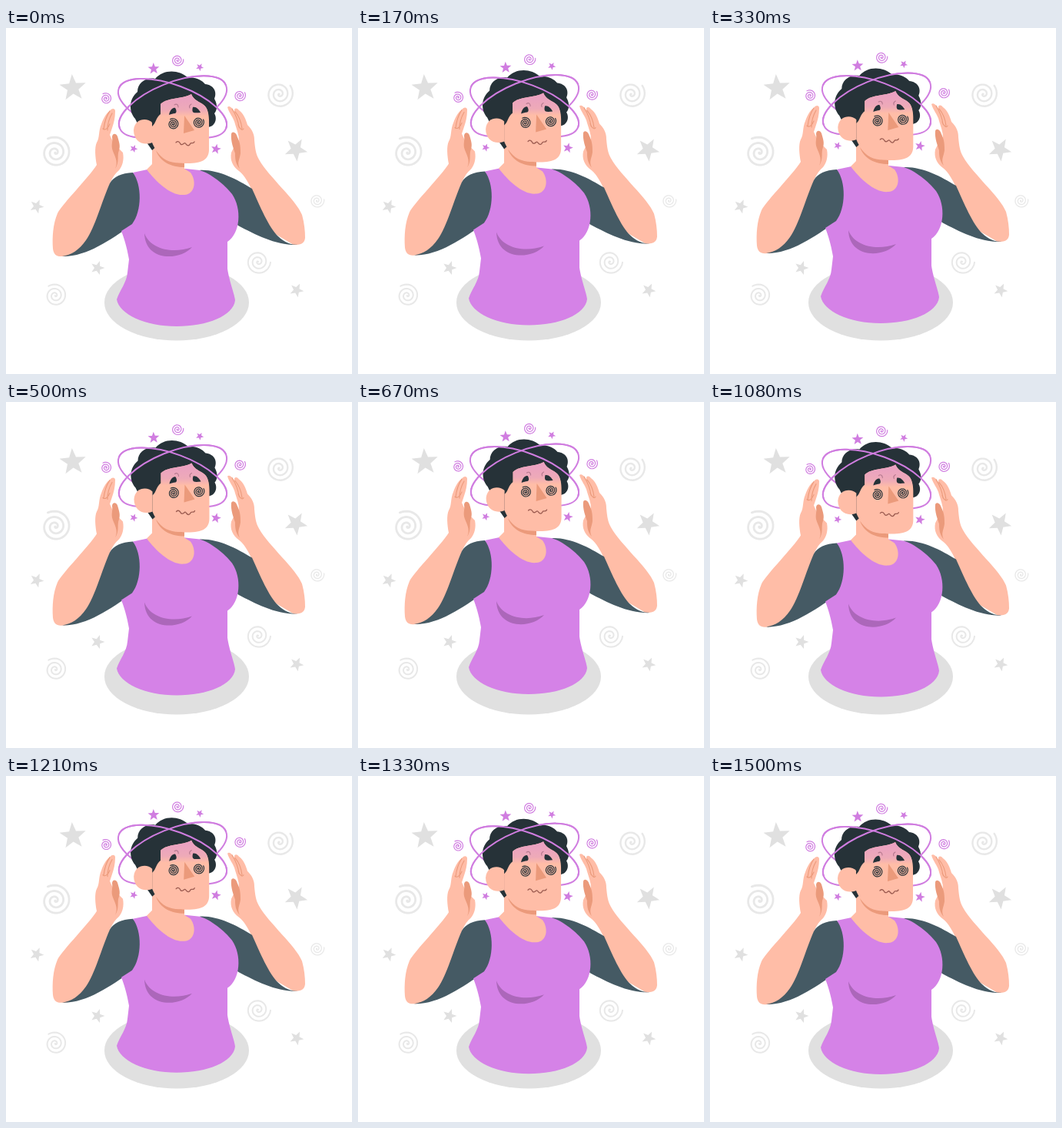
Recreate the animation shown at these times as an HTML page. Size 450 px wide and 450 px high, loop 1.54 s.

```html
<!DOCTYPE html>
<html lang="en">
<head>
<meta charset="utf-8">
<title>Dizzy</title>
<style>
html, body { margin: 0; width: 100%; height: 100%; overflow: hidden; background: #fff; }
svg { display: block; width: 100%; height: 100%; }
.skin { fill: #ffbda7; }
.shade { fill: #eb9a7b; }
.dark { fill: #263238; }
.sleeve { fill: #455a64; }
.shirt { fill: #d582e7; }
.ring { fill: none; stroke: #d07de0; stroke-width: 2; }
.line { fill: none; stroke: #eb9a7b; stroke-width: 1.1; stroke-linecap: round; }
</style>
</head>
<body>
<svg viewBox="0 0 450 450">
  <defs>
    <linearGradient id="flush" x1="0" y1="0" x2="0" y2="1">
      <stop offset="0" stop-color="#e99fc4"/>
      <stop offset=".7" stop-color="#eeaab8"/>
      <stop offset="1" stop-color="#ffbda7"/>
    </linearGradient>
  </defs>
  <g id="backdrop"></g>
  <ellipse cx="222" cy="357" rx="94" ry="49.5" fill="#e0e0e0"/>

  <g id="body">
    <g class="ring">
      <ellipse rx="74.4" ry="30.3" transform="translate(216.5 104.5) rotate(20.4)"/>
      <ellipse rx="74.5" ry="31" transform="translate(217 102.5) rotate(-22)"/>
    </g>

    <!-- left arm -->
    <path class="skin" d="M118 178C116 168 115 155 118 149C122 143 120 134 124 125C127 116 132 109 135 108C137 104 142 104 142 108C142 117 140 124 138 130L135 139L140 150L152 162C154 172 151 180 147 185C142 189 139 194 136 200L110 272C98 291 86 297 74 297C66 298 62 295 61 287C60 272 61 255 67 241C74 228 108 194 118 178Z"/>
    <path class="shade" d="M138 142C138 137 143 136 145 141C147 148 149 153 147 159C144 166 148 174 142 183C147 173 140 165 138 157C137 151 139 147 138 142Z"/>
    <path class="line" d="M127 132C128 122 131 114 135 108M132 133C132 125 135 116 138 111M126 131C129 134 133 130 135 125"/>
    <path class="sleeve" d="M165 188C150 189 140 193 135 202C124 227 116 259 104 276C95 289 85 295 73 297C104 298 135 276 164 256C181 238 180 202 165 188Z"/>

    <!-- right arm -->
    <path class="skin" d="M288 103C290 101 293 103 294 105L297 109C296 104 300 103 303 107C309 111 312 119 314 126C320 132 323 138 323 146C324 157 325 164 329 171C342 194 377 223 385 243C388 254 389 264 389 273C388 281 383 282 374 282L340 262L318 207C312 195 308 190 303 186C295 180 291 172 293 162L299 150L303 146C303 139 300 132 298 125C296 116 290 111 288 103Z"/>
    <path class="shade" d="M293 138C294 134 299 135 301 142C305 150 305 156 305 163C304 171 300 175 304 183C298 176 298 169 298 163C296 157 292 147 293 138Z"/>
    <path class="line" d="M294 105C299 113 302 121 303 129M298 109C304 116 306 123 307 131M302 126C304 132 308 134 309 131"/>
    <path class="sleeve" d="M252 185C276 184 300 197 320 209C330 231 342 260 354 271C362 279 371 282 380 282C351 283 325 269 302 257L270 225Z"/>

    <!-- torso -->
    <path class="shirt" d="M165 188L184 184L233 183L252 185C266 189 285 204 294 216C307 235 305 267 288 278V313C290 328 298 349 298 354C296 374 262 388 222 388C181 388 147 372 144 353C148 341 157 331 158 318L160 301C157 284 154 275 150 264L164 255C177 238 177 204 165 188Z"/>
    <path d="M180 267C188 288 217 294 242 285C226 303 181 304 180 267Z" fill="#ac67ba"/>
    <path class="skin" d="M190 145V177L183 184C195 200 215 219 232 217C246 216 248 199 240 188L232 183V165Z"/>
    <path class="shade" d="M195 159C204 173 217 177 232 175V181C215 181 200 174 195 159Z"/>

    <g id="head">
      <path class="dark" d="M190 159L183 149L168 118C160 109 159 93 171 83C171 72 181 64 194 66C204 54 224 53 237 65C245 63 254 67 259 73C270 74 275 83 271 92C276 101 274 108 271 111C276 120 270 129 262 129L250 145L200 150Z"/>
      <path class="skin" d="M201 112V99C210 90 228 93 241 86C244 94 252 96 257 100C262 103 264 112 264 120V158C264 171 255 176 236 176C214 176 196 166 190 149V128C195 124 195 116 201 112Z"/>
      <path d="M201 115V99C210 90 228 93 241 86C244 94 252 96 257 100C261 103 263 109 263 115Z" fill="url(#flush)"/>
      <path class="skin" d="M190 123C183 116 167 118 166 133C166 147 178 154 190 149Z"/>
      <path class="shade" d="M232 114L245 133L231 137Z"/>
      <path class="dark" d="M212 113C213 107 217 103 220 104C222 107 222 110 220 111C217 111 215 112 212 113ZM253 110C251 106 247 102 243 103C242 106 242 109 244 110C247 111 250 110 253 110Z"/>
      <path class="line" style="stroke:#b6798f" d="M219 100C222 98 224 100 224 103M241 99C239 100 238 102 239 104"/>
      <path d="M221 149C224 146 226 149 227 151C230 154 232 147 234 151C237 155 239 152 240 150C242 149 244 151 245 148" fill="none" stroke="#9b5b50" stroke-width="1.3" stroke-linecap="round"/>
      <g id="eyes"></g>
    </g>

    <g class="ring">
      <path d="M-74.4 0A74.4 30.3 0 0 1 74.4 0" transform="translate(216.5 104.5) rotate(20.4)"/>
      <path d="M-74.5 0A74.5 31 0 0 1 74.5 0" transform="translate(217 102.5) rotate(-22)"/>
    </g>
    <g id="orbit"></g>
  </g>
</svg>
<script>
const LOOP = 1540, PEAK = 720, RISE = 8;
const $ = id => document.getElementById(id);
const polar = (x, y, r, a) => `${(x + r * Math.cos(a)).toFixed(2)} ${(y + r * Math.sin(a)).toFixed(2)}`;
const rad = deg => deg * Math.PI / 180;

function addPath(parent, d, attrs) {
  const path = document.createElementNS('http://www.w3.org/2000/svg', 'path');
  path.setAttribute('d', d);
  for (const key in attrs) path.setAttribute(key, attrs[key]);
  $(parent).append(path);
}

// Winds clockwise from its outer end at the given angle into the centre.
function spiral(parent, x, y, radius, angle, color, width, turns = 2.75) {
  const steps = 90, points = [];
  for (let i = 0; i <= steps; i++) {
    const u = i / steps;
    points.push(polar(x, y, radius * (1 - u), rad(angle) + u * turns * 2 * Math.PI));
  }
  addPath(parent, 'M' + points.join('L'), {
    fill: 'none', stroke: color, 'stroke-width': width, 'stroke-linecap': 'round'
  });
}

function star(parent, x, y, radius, angle, color) {
  const points = [];
  for (let i = 0; i < 10; i++) points.push(polar(x, y, radius * (i % 2 ? .42 : 1), rad(angle + i * 36)));
  addPath(parent, 'M' + points.join('L') + 'Z', { fill: color });
}

const GREY = '#e0e0e0', PALE = '#e8e8e8', PURPLE = '#d07de0', INK = '#263238';

[[87, 78, 18, -22], [377, 158, 15.5, 12], [40, 232, 9.5, 5], [119, 312, 9.5, 0], [378, 341, 9.5, 8]]
  .forEach(s => star('backdrop', ...s, GREY));
[[64, 162, 20.5, -118, 2.8], [355.5, 86, 18, -38, 2.4], [64, 348, 15, -125, 2], [328, 304, 16, 3, 2], [404.5, 224.5, 9.3, -10, 1.3]]
  .forEach(([x, y, r, a, w]) => spiral('backdrop', x, y, r, a, PALE, w));
[[192, 53, 7.8, -20], [252, 51, 5.3, 12], [166, 157, 5.3, 5], [273, 157.5, 6.8, -5]]
  .forEach(s => star('orbit', ...s, PURPLE));
[[223, 42, 7.8, -8], [130, 92, 7.4, -122], [304, 88, 7.6, -32]]
  .forEach(s => spiral('orbit', ...s, PURPLE, 1.2));
spiral('eyes', 217.3, 125, 7.2, -120, INK, 1.2, 3.2);
spiral('eyes', 250.3, 122.7, 7.2, -30, INK, 1.2, 3.2);

function draw(now) {
  const lift = (1 + Math.cos((now % LOOP - PEAK) / LOOP * 2 * Math.PI)) / 2;
  $('body').setAttribute('transform', `translate(0 ${-RISE * lift})`);
  $('head').setAttribute('transform', `translate(${.6 * lift} 0)`);
  requestAnimationFrame(draw);
}
draw(performance.now());
</script>
</body>
</html>
```
